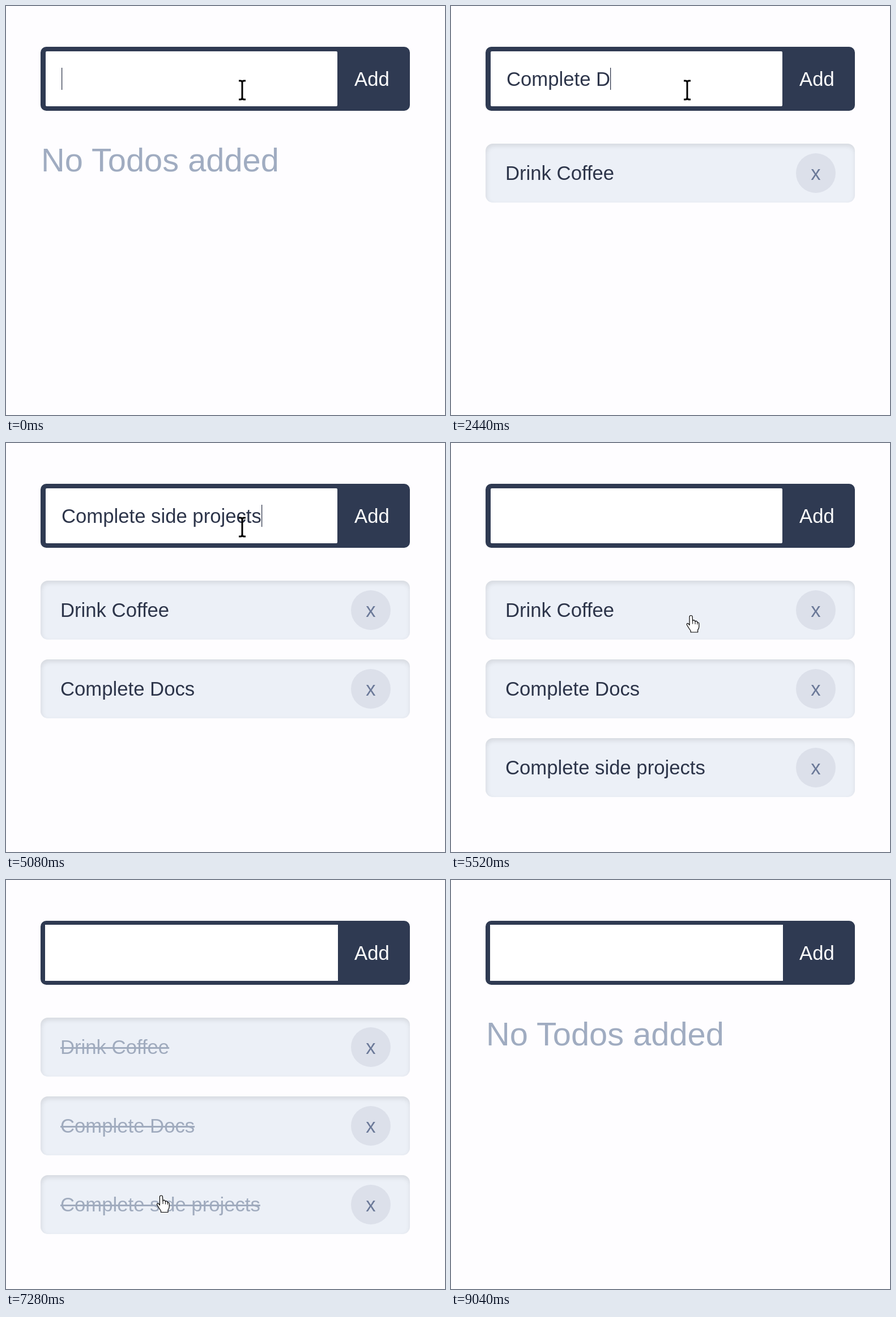
Animation, 775 px wide and 722 px high, one loop 9520 ms. Source, as an HTML page:

```html
<!DOCTYPE html>
<html lang="en">
<head>
<meta charset="utf-8">
<title>Todo list</title>
<style>
  html, body { margin: 0; width: 100%; height: 100%; overflow: hidden; background: #fefdff; }
  body { position: relative; font: 34.7px/40px "Liberation Sans", Arial, sans-serif; color: #2d354a; }
  div, svg { position: absolute; }
  div { white-space: pre; }
  #form { left: 61px; top: 72px; width: 652px; height: 113px; border-radius: 10px; background: #2f3a52; }
  #field { left: 69px; top: 79px; width: 517px; height: 99px; background: #fff; }
  #field.focus { left: 70px; top: 80px; width: 515px; height: 97px; border-radius: 2px; }
  #typed { left: 98px; top: 109px; height: 39px; border-right: 1px solid transparent; }
  #typed.caret { border-color: #2d354a; box-shadow: 1px 0 rgba(45, 53, 74, .25); }
  #add { left: 615px; top: 109px; color: #fff; }
  #empty { left: 62px; top: 239px; font-size: 57.8px; line-height: 66px; color: #a0acc1; }
  .item {
    left: 61px; width: 652px; height: 104px; border-radius: 13px; background: #ecf0f7;
    box-shadow: inset 1px 3.9px 8px rgba(0, 0, 0, .1);
  }
  .label { left: 35px; top: 32px; }
  .done .label { color: #a0abbe; text-decoration: line-through 3px; }
  .remove {
    left: 548px; top: 17px; width: 70px; height: 70px; border-radius: 50%;
    background: #dce0ea; color: #6b7998; line-height: 71px; text-align: center;
  }
  svg { left: 0; top: 0; overflow: visible; }
</style>
</head>
<body>
<div id="form"></div>
<div id="field"></div>
<div id="typed"></div>
<div id="add">Add</div>
<div id="empty">No Todos added</div>
<svg id="cursor" width="1" height="1">
  <path id="beam" d="M-6-16H-3Q0-16 0-13V13Q0 17-3 17H-6M6-16H3Q0-16 0-13V13Q0 17 3 17H6" fill="none" stroke="#000" stroke-width="3"/>
  <g id="hand" fill="#fff" stroke="#000" stroke-width="1.2" stroke-linejoin="round">
    <path d="M-2.6 17V2.4Q-2.6 0 0 0T2.4 2.4L3 10Q3.4 8 5.2 8.2T7.4 11Q8 9.4 9.6 9.8T11.3 12.4Q14.3 11.6 14.2 15V20Q14 23 12 25.5V29.5H-.5V27Q-3.5 23-7 17Q-8 14.6-6.4 14T-2.6 17Z"/>
    <path d="M3 10V15M7.4 11V15.5M11.3 12.4V16" fill="none" stroke-width="1"/>
  </g>
  <path id="arrow" d="M0 0V24L5.6 18.8L9.3 27.3L13.4 25.5L9.7 17.3H17.3Z" stroke="#fff" stroke-width="1.6"/>
</svg>
<script>
const LOOP = 9520, STEP = 40, PITCH = 139.2;
const $ = id => document.getElementById(id);
const clamp = v => Math.min(1, Math.max(0, v));
const ease = p => p * p * (3 - 2 * p);
const within = (v, a, b) => v >= a && v < b;

// Typing bursts: text, first key, last key; '\n' is Enter
const bursts = [
  ['Drink ', 200, 600], ['Coffee\n', 800, 1080],
  ['Comp', 1280, 1680], ['lete ', 1800, 2160], ['Docs\n', 2400, 2600],
  ['Complete ', 3120, 3840], ['side projects\n', 4280, 5120]
];
const keys = bursts.flatMap(([text, from, to]) =>
  [...text].map((key, i) => ({ key, at: from + (to - from) * i / (text.length - 1) })));

const tickAt = i => 5580 + 700 * i;
const removeAt = i => 7880 + 280 * i;
const blurAt = tickAt(0), leaveHand = 8600;

// Pointer stops: departure time to reach the stop, place, sideways bow of the path
const TRAVEL = 360;
const stops = [
  { at: 0, x: 417, y: 148, bow: 0 },
  { at: 5200, x: 425, y: 310, bow: .1 },
  { at: 5760, x: 475, y: 469, bow: .1 },
  { at: 6440, x: 274, y: 557, bow: -1.7 },
  { at: 7280, x: 645, y: 284, bow: .1 },
  { at: 8760, x: 810, y: 700, bow: .1 }
];

const rows = [0, 1, 2].map(i => {
  const item = document.createElement('div');
  item.style.top = 243 + i * PITCH + 'px';
  item.innerHTML = '<div class="label"></div><div class="remove">x</div>';
  document.body.insertBefore(item, $('cursor'));
  return item;
});

function pointer(t) {
  const n = stops.filter(s => s.at <= t).length - 1;
  const to = stops[n], from = stops[Math.max(0, n - 1)];
  const p = ease(clamp((t - to.at) / TRAVEL)), arc = 2 * p * (1 - p) * to.bow;
  const dx = to.x - from.x, dy = to.y - from.y;
  return [from.x + dx * p - dy * arc, from.y + dy * p + dx * arc];
}

function shape(t, x, y, count) {
  if (within(x, 69, 586) && within(y, 79, 178)) return 'beam';
  if (within(t, removeAt(2), leaveHand)) return 'hand';
  const overItem = within(x, 61, 713) && within(y, 243, 243 + PITCH * count) && (y - 243) % PITCH < 104;
  return overItem ? 'hand' : 'arrow';
}

function draw(t) {
  const pressed = keys.filter(k => k.at <= t);
  const lines = pressed.map(k => k.key).join('').split('\n');
  const idle = pressed.length ? t - pressed[pressed.length - 1].at : 0;
  const focus = t < blurAt;
  $('field').className = focus ? 'focus' : '';
  $('typed').textContent = lines.pop();
  $('typed').className = focus && idle <= 240 ? 'caret' : '';

  const gone = rows.filter((_, i) => removeAt(i) <= t).length;
  const count = lines.length - gone;
  rows.forEach((row, i) => {
    row.style.display = i < count ? 'block' : 'none';
    row.className = tickAt(i + gone) <= t ? 'item done' : 'item';
    row.firstChild.textContent = lines[i + gone] || '';
  });
  $('empty').style.display = count ? 'none' : 'block';

  const [x, y] = pointer(t), kind = shape(t, x, y, count);
  $('cursor').style.transform = `translate(${x}px, ${y}px)`;
  for (const k of ['beam', 'hand', 'arrow']) $(k).style.display = k === kind ? 'inline' : 'none';
}

const began = performance.now();
function tick(now) {
  draw(Math.floor(Math.max(0, now - began) % LOOP / STEP) * STEP);
  requestAnimationFrame(tick);
}
draw(0);
requestAnimationFrame(tick);
</script>
</body>
</html>
```
